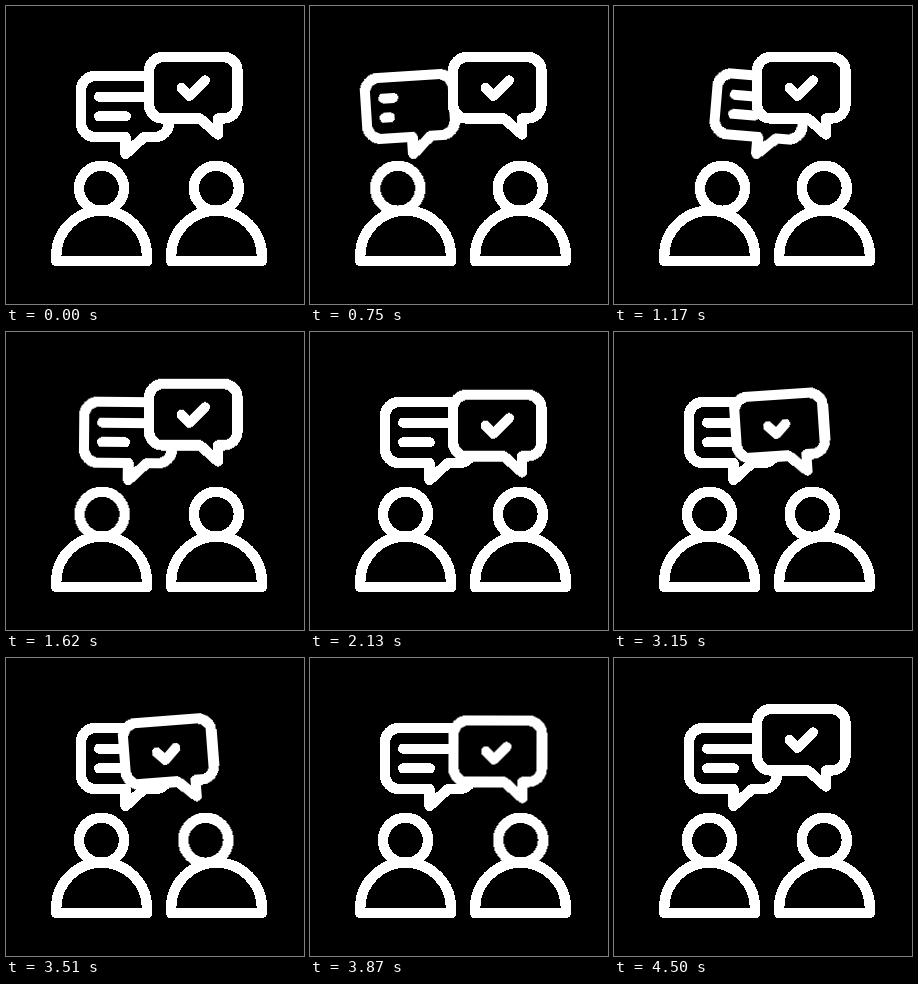
Write an HTML page that moves like this. It is 298x298 px and loops after 4.83 s.

```html
<!DOCTYPE html>
<html lang="en">
<head>
<meta charset="utf-8">
<title>Two people talking</title>
<style>
  html, body { margin: 0; width: 100%; height: 100%; overflow: hidden; background: #000; }
  svg { display: block; width: 100vw; height: 100vh; }
  path, circle {
    fill: #000; stroke: #fff; stroke-width: 10.4;
    stroke-linecap: round; stroke-linejoin: round;
    shape-rendering: crispEdges;
  }

  .left { --dir: -1; --delay: 0ms; }
  .right { --dir: 1; --delay: -2680ms; }
  .body { fill: none; }
  .lift { animation: lift 4830ms cubic-bezier(.5, 0, .5, 1) infinite; }
  .head { animation: nod 4830ms cubic-bezier(.65, 0, .35, 1) var(--delay) infinite; }
  .bubble { animation: sway 4830ms cubic-bezier(.65, 0, .35, 1) var(--delay) infinite; }
  .left .bubble { transform-origin: 119px 100px; }
  .right .bubble { transform-origin: 187px 82px; }
  .ink {
    fill: none; stroke-width: 10; stroke-dasharray: 1 2;
    animation: draw 4830ms linear var(--delay) infinite;
  }

  @keyframes sway {
    0% { transform: none; animation-timing-function: cubic-bezier(.45, 0, .4, 1); }
    11.2% { transform: translateX(calc(var(--dir) * 26.5px)) rotate(calc(var(--dir) * 5deg)); }
    24.6% { transform: translateX(calc(var(--dir) * -27px)) rotate(calc(var(--dir) * -4.8deg)); }
    38.3% { transform: translateX(calc(var(--dir) * 1.6px)) rotate(calc(var(--dir) * .3deg)); }
    43%, 100% { transform: none; }
  }
  @keyframes nod {
    0% { transform: none; animation-timing-function: cubic-bezier(.45, 0, .4, 1); }
    11.2% { transform: translateX(calc(var(--dir) * 12.8px)); }
    23% { transform: translateX(calc(var(--dir) * -13px)); }
    37.5% { transform: translateX(calc(var(--dir) * .6px)); }
    42%, 100% { transform: none; }
  }
  @keyframes draw {
    0% { stroke-dashoffset: 0; }
    11.2% { stroke-dashoffset: 1; }
    15.5% { stroke-dashoffset: .8; }
    20.7% { stroke-dashoffset: .26; }
    35.6% { stroke-dashoffset: .13; }
    44.5%, 100% { stroke-dashoffset: 0; }
  }
  @keyframes lift {
    0%, 31% { transform: none; }
    43.7%, 78.7% { transform: translateY(11.7px); }
    93.2%, 100% { transform: none; }
  }
</style>
</head>
<body>
<svg viewBox="0 0 298 298">
  <g class="left">
    <circle class="head" cx="95.5" cy="182.3" r="22.5"/>
    <path class="body" d="M50.2 255.1V250A45.4 45.4 0 0 1 141 250V255.1Z"/>
    <g class="bubble">
      <path d="M119.5 131H89A14 14 0 0 1 75 117V84A14 14 0 0 1 89 70H149A14 14 0 0 1 163 84V117A14 14 0 0 1 149 131H138L119.5 148Z"/>
      <path class="ink" pathLength="1" d="M93 90.7H141"/>
      <path class="ink" pathLength="1" d="M93 110.3H120"/>
    </g>
  </g>
  <g class="right">
    <circle class="head" cx="210.3" cy="182.3" r="22.5"/>
    <path class="body" d="M165.1 255.1V250A45.4 45.4 0 0 1 255.9 250V255.1Z"/>
    <g class="lift">
      <g class="bubble">
        <path d="M212 112.5V128.5L194 112.5H157A14 14 0 0 1 143 98.5V65A14 14 0 0 1 157 51H217.5A14 14 0 0 1 231.5 65V98.5A14 14 0 0 1 217.5 112.5Z"/>
        <path class="ink" pathLength="1" d="M175.5 82L183.4 90L199 74.3"/>
      </g>
    </g>
  </g>
</svg>
</body>
</html>
```
